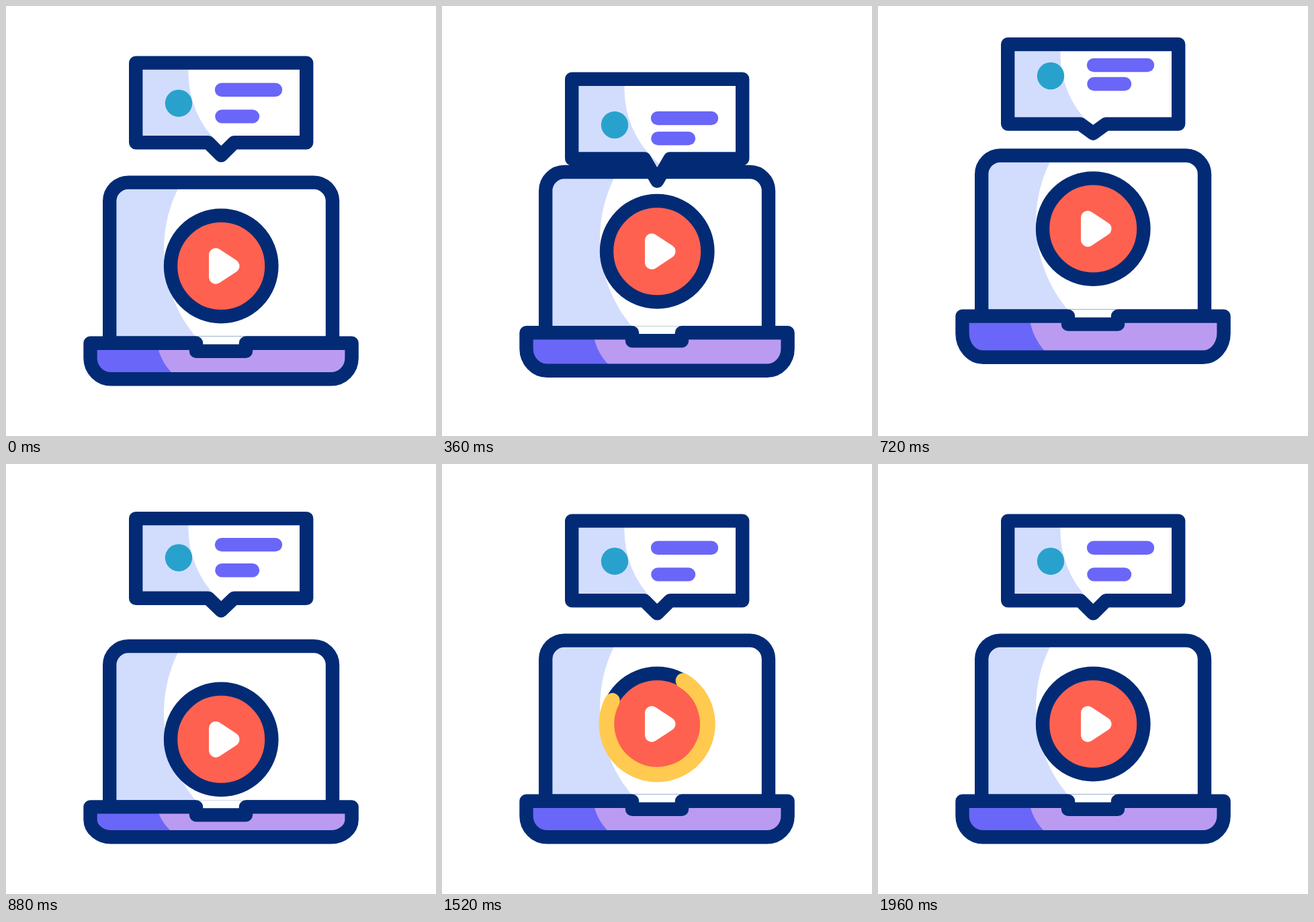
Animation, 640 px wide and 640 px high, one loop 2000 ms. Source, as an HTML page with a canvas:

```html
<!DOCTYPE html>
<html lang="en">
<head>
<meta charset="utf-8">
<title>Video message</title>
<style>
html, body { margin: 0; width: 100%; height: 100%; overflow: hidden; background: #fff; }
canvas { display: block; width: 100vmin; height: 100vmin; margin: 0 auto; }
</style>
</head>
<body>
<canvas id="stage"></canvas>
<script>
const SIZE = 640, LOOP = 2000, STEP = 40, LINE = 20.4;
const NAVY = '#032b75', SHADE = '#d2ddfd', TEAL = '#28a2cc', INDIGO = '#6a66f8';
const VIOLET = '#ba9bf1', RED = '#ff6150', YELLOW = '#ffca4f', WHITE = '#fff';

const canvas = document.getElementById('stage');
const ctx = canvas.getContext('2d');
const scale = window.devicePixelRatio || 1;
canvas.width = canvas.height = SIZE * scale;

const ease = s => s * s * (3 - 2 * s);
const ramp = (t, a, b) => ease(Math.min(1, Math.max(0, (t - a) / (b - a))));

// Eased value through the given times and values, clamped at both ends.
function track(t, times, values) {
  let v = values[0];
  for (let i = 1; i < times.length; i++) {
    v += (values[i] - values[i - 1]) * ramp(t, times[i - 1], times[i]);
  }
  return v;
}

const bob = (t, down, up) => track(t, [100, 400, 695, 932], [0, down, up, 0]);
const hop = (t, up, land, end = 1080) => track(t, [130, 695, 870, end], [0, up, land, 0]);

function poly(points) {
  const p = new Path2D();
  points.forEach(([x, y], i) => i ? p.lineTo(x, y) : p.moveTo(x, y));
  p.closePath();
  return p;
}

function disc(x, y, r) {
  const p = new Path2D();
  p.arc(x, y, r, 0, Math.PI * 2);
  return p;
}

function fill(path, color) {
  ctx.fillStyle = color;
  ctx.fill(path);
}

function stroke(path, color, width = LINE) {
  ctx.strokeStyle = color;
  ctx.lineWidth = width;
  ctx.stroke(path);
}

function bar(x1, x2, y, color) {
  const p = new Path2D();
  p.moveTo(x1, y);
  p.lineTo(x2, y);
  stroke(p, color, 20.4);
}

// Fills a body, tints the part left of a curve, then outlines it.
function panel(body, base, tint, cut) {
  ctx.save();
  ctx.clip(body);
  fill(body, tint);
  fill(cut, base);
  ctx.restore();
  stroke(body, NAVY);
}

function drawLaptop(t) {
  const dy = hop(t, -43, 8.6);
  const top = 501.8 + dy;
  const bottom = 555.3 + hop(t, -34.5, 0);
  const k = (bottom - top) / 53.5;

  const lid = new Path2D();
  lid.roundRect(154.2, 262.6 + dy, 331.8, 239.2, [28, 28, 0, 0]);
  panel(lid, WHITE, SHADE, (() => {
    const p = disc(438, 362 + dy, 203);
    p.rect(438, 200, 100, 340);
    return p;
  })());

  const ry = 31 * k, left = 125.5, right = 514.6;
  const base = new Path2D();
  base.moveTo(283, top);
  base.lineTo(283, top + 12);
  base.lineTo(357, top + 12);
  base.lineTo(357, top);
  base.lineTo(right, top);
  base.lineTo(right, bottom - ry);
  base.ellipse(right - 31, bottom - ry, 31, ry, 0, 0, Math.PI / 2);
  base.lineTo(left + 31, bottom);
  base.ellipse(left + 31, bottom - ry, 31, ry, 0, Math.PI / 2, Math.PI);
  base.lineTo(left, top);
  base.closePath();

  const cut = new Path2D();
  cut.moveTo(225, top);
  cut.quadraticCurveTo(229, top + 31 * k, 257, bottom);
  cut.lineTo(530, bottom);
  cut.lineTo(530, top);
  cut.closePath();

  fill(poly([[283, top - 10], [357, top - 10], [357, top + 12], [283, top + 12]]), WHITE);
  panel(base, VIOLET, INDIGO, cut);
}

function drawButton(t) {
  const size = track(t, [1100, 1230, 1360], [1, 0.911, 1]);
  const x = 320.2;
  const y = 387 + hop(t, -60, 23, 1100) + 19 * (1 - size);
  const r = 75.2 * size;

  const ring = disc(x, y, r);
  fill(ring, RED);
  stroke(ring, NAVY);

  const head = ramp(t, 1215, 1630), tail = ramp(t, 1425, 1950);
  if (head > tail) {
    const angle = f => (f - 0.25) * Math.PI * 2;
    const arc = new Path2D();
    arc.arc(x, y, r, angle(tail), angle(head));
    stroke(arc, YELLOW, 22.7);
  }

  ctx.save();
  ctx.translate(x, y);
  ctx.scale(size, size);
  const play = poly([[-8, -16.6], [17.2, 0], [-8, 16.6]]);
  fill(play, WHITE);
  stroke(play, WHITE, 20.4);
  ctx.restore();
}

function drawBubble(t) {
  const dy = bob(t, 25.4, -28.5);
  const top = 84.6 + dy, bottom = 203.2 + dy;
  const tip = 222.4 + bob(t, 40, -34);
  const body = poly([
    [193.2, top], [447.2, top], [447.2, bottom], [339.5, bottom],
    [320.2, tip], [301, bottom], [193.2, bottom]
  ]);
  const cut = disc(415.5, 100 + dy, 144);
  cut.rect(271.5, top, 200, 15.4);
  panel(body, WHITE, SHADE, cut);

  fill(disc(257, 144.7 + bob(t, 34, -42), 20.2), TEAL);
  bar(321, 401, 124.8 + bob(t, 44.4, -38), INDIGO);
  bar(321.4, 367, 164.4 + bob(t, 34.4, -50), INDIGO);
}

function draw(t) {
  ctx.setTransform(scale, 0, 0, scale, 0, 0);
  ctx.fillStyle = WHITE;
  ctx.fillRect(0, 0, SIZE, SIZE);
  ctx.lineJoin = ctx.lineCap = 'round';
  drawLaptop(t);
  drawButton(t);
  drawBubble(t);
}

const start = performance.now();

function tick() {
  const t = (performance.now() - start) % LOOP;
  draw(Math.floor(t / STEP) * STEP);
  requestAnimationFrame(tick);
}

tick();
</script>
</body>
</html>
```
